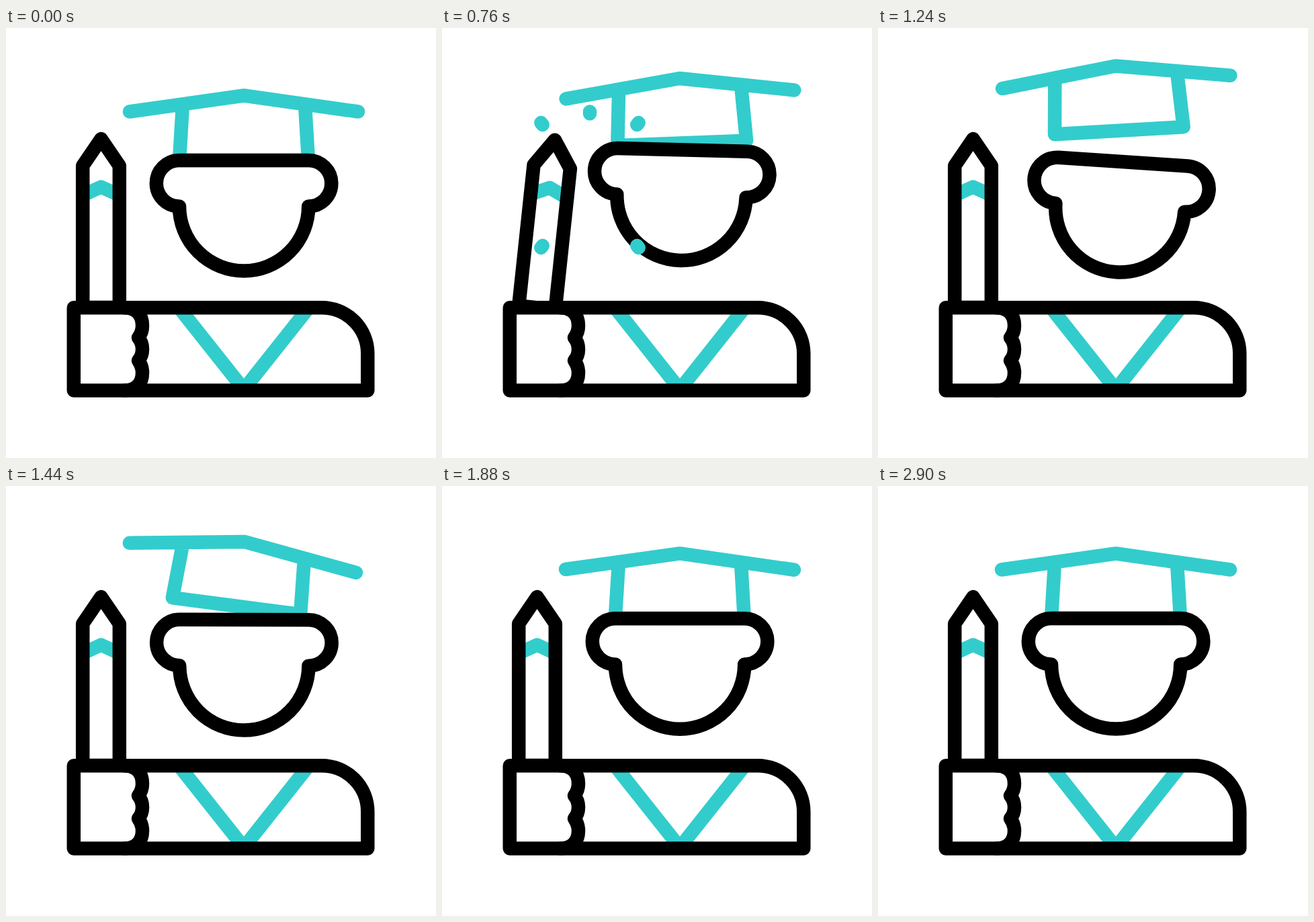
Animation, 640 px wide and 640 px high, one loop 3.28 s. Source, as an HTML page:

```html
<!DOCTYPE html>
<html lang="en">
<head>
<meta charset="utf-8">
<title>Graduate</title>
<style>
  html, body { margin: 0; height: 100%; overflow: hidden; background: #fff; }
  svg { display: block; width: 100vw; height: 100vh; }
  path { fill: none; stroke: #000; stroke-width: 20.5; stroke-linecap: round; stroke-linejoin: round; }
  .accent { stroke: #33cccc; }
</style>
</head>
<body>
<svg viewBox="0 0 640 640">
  <clipPath id="above"><path d="M0 0H640V417H0Z"/></clipPath>

  <path id="cap" class="accent" d="M184 124.5L354 100.5L524 124.5M263 114L258 197H450L445 114"/>
  <path id="head" d="M258 197H450.2A34.2 34.2 0 0 1 450.2 265.4A96 96 0 0 1 258 265.4A34.2 34.2 0 0 1 258 197Z"/>
  <path id="smile" class="accent" pathLength="1" d="M318 305A41 41 0 0 0 390 305"/>

  <g clip-path="url(#above)">
    <g id="pencil">
      <path class="accent" d="M114.2 249L141.5 236.5L168.8 249"/>
      <path d="M114.2 416V205L141.5 165L168.8 205V416Z"/>
    </g>
  </g>

  <path class="accent" d="M257.5 416.3L354 538L450.5 416.3"/>
  <path d="M100.8 416.3H470A68.3 68.3 0 0 1 538.3 484.6V539.4H100.8Z"/>
  <path d="M176 416.3C195 416.3 203 428 203 443Q203 453 197 461Q203 468 203 478Q203 488 197 495Q203 503 203 513C203 528 195 539.4 176 539.4"/>
  <path id="sparks" class="accent"/>
</svg>
<script>
const LOOP = 3280;
// Main beats in ms: the pencil hits, the cap peaks, lands, presses the head down, all settles.
const HIT = 567, TOP = 1033, LAND = 1467, PRESS = 1650, REST = 1900;

const [cap, head, smile, pencil, sparks] =
  ['cap', 'head', 'smile', 'pencil', 'sparks'].map(id => document.getElementById(id));

function place(el, y, angle, pivotX, pivotY) {
  el.setAttribute('transform', `translate(0 ${y}) rotate(${angle} ${pivotX} ${pivotY})`);
}

// Rays burst from the point of impact; steeper ones are shorter.
function sparkPath(tail, tip) {
  if (tip - tail < 0.1) return '';
  return [-128, -90, -52, 52, 128].map(degrees => {
    const a = degrees * Math.PI / 180;
    const reach = 1.75 - Math.abs(Math.sin(a));
    const point = d => {
      const r = 79.5 + d * reach;
      return `${220 + r * Math.cos(a)} ${234 + r * Math.sin(a)}`;
    };
    return `M${point(tail)}L${point(tip)}`;
  }).join('');
}

function draw(t) {
  // Progress from 0 to 1 between two times, eased in and out.
  const move = (from, to) => {
    const u = Math.min(1, Math.max(0, (t - from) / (to - from)));
    return u * u * (3 - 2 * u);
  };
  const press = move(LAND, PRESS), settle = move(PRESS, REST);

  place(pencil, 0, 12.4 * (move(330, HIT) - move(HIT, 950)), 138.5, 415);

  const capY = -68 * move(HIT, TOP) + 51 * move(TOP, LAND) + 10 * press + 7 * settle;
  const capTurn = -3.5 * move(HIT, 900) + 11.3 * move(1220, LAND) - 7.8 * settle;
  place(cap, capY, capTurn, 354, 112);

  const headY = -19 * move(HIT, 833) + 21 * move(833, 1267) + 8.5 * press - 10.5 * settle;
  const headTurn = 3.8 * (move(HIT, TOP) - move(1240, LAND));
  place(head, headY, headTurn, 354, 359);

  const grin = move(1940, 2370) - move(2600, 2900);
  smile.style.visibility = grin > 0.005 ? 'visible' : 'hidden';
  smile.setAttribute('stroke-dasharray', `${grin} 2`);

  sparks.setAttribute('d', sparkPath(40 * move(600, 800), 40 * move(500, 700)));
}

function tick() {
  draw(performance.now() % LOOP);
  requestAnimationFrame(tick);
}
tick();
</script>
</body>
</html>
```
